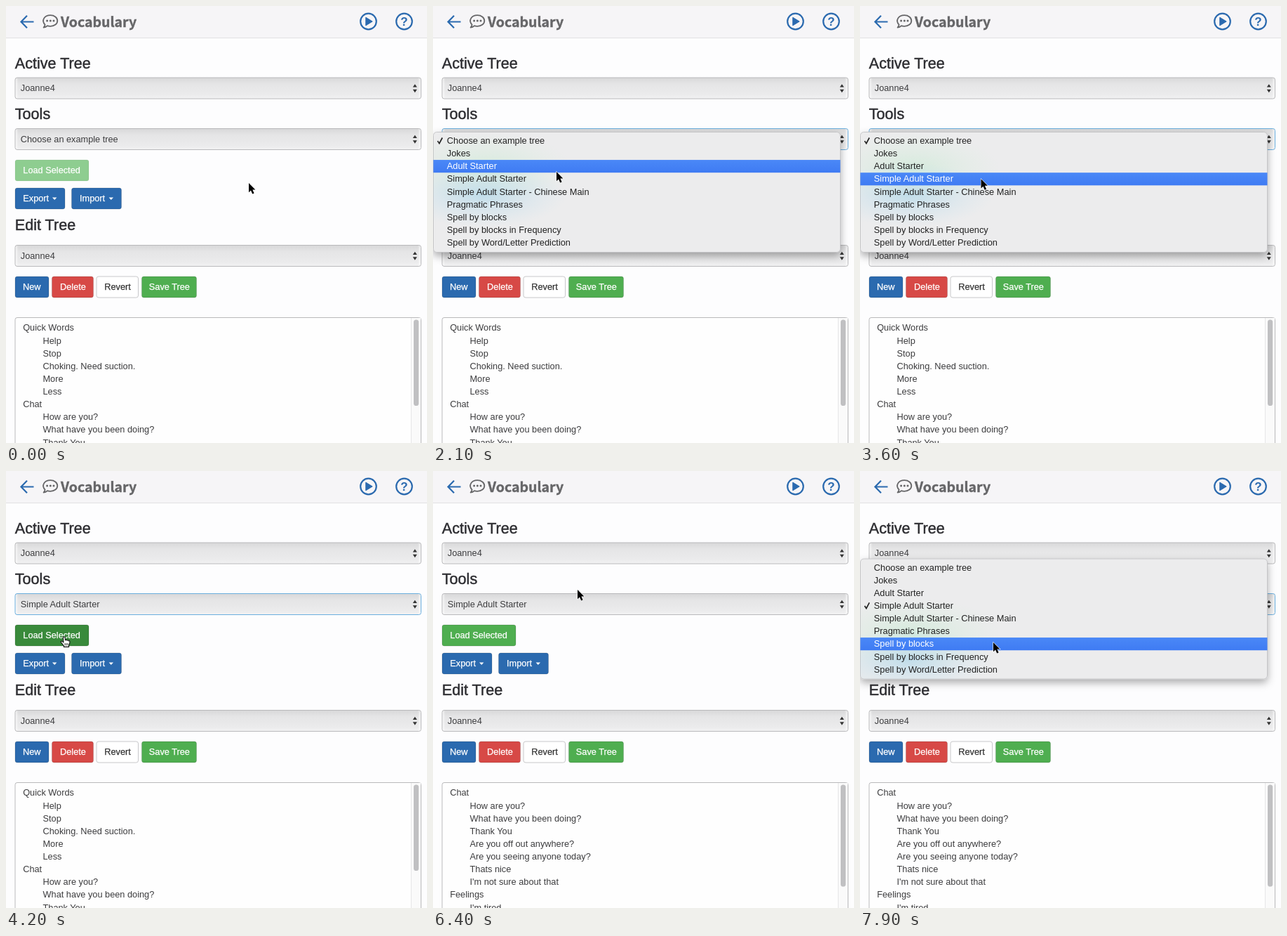
These frames come from a looping animation (600x622 px, 8 s). An HTML page:

```html
<!DOCTYPE html>
<html lang="en">
<head>
<meta charset="utf-8">
<title>Vocabulary</title>
<style>
  html, body { margin: 0; width: 100%; height: 100%; overflow: hidden; background: #fdfdfe; }
  svg { display: block; }
  text { font: 12.75px "Liberation Sans", Arial, sans-serif; fill: #3c3c3e; white-space: pre; }
  .title { font: 700 19.5px "Noto Sans CJK JP", "Noto Sans CJK SC", "Noto Sans", sans-serif; fill: #666668; stroke: #666668; stroke-width: .4px; }
  .head { font-size: 21.6px; fill: #2c2c30; stroke: #2c2c30; stroke-width: .45px; }
  .btn { fill: #fff; stroke: #fff; stroke-width: .25px; }
  .plain { fill: #333; stroke: #333; }
  .item { font-size: 12.8px; fill: #222; }
  .on { fill: #fff; }
</style>
</head>
<body>
<svg id="stage" width="600" height="622" viewBox="0 0 600 622">
  <defs>
    <linearGradient id="field" x1="0" y1="0" x2="0" y2="1">
      <stop offset="0" stop-color="#d8d8d9"/>
      <stop offset=".3" stop-color="#e5e5e6"/>
      <stop offset=".8" stop-color="#ebebec"/>
      <stop offset="1" stop-color="#f2f2f3"/>
    </linearGradient>
    <linearGradient id="ends">
      <stop offset="0" stop-color="#fff" stop-opacity=".8"/>
      <stop offset=".008" stop-color="#fff" stop-opacity="0"/>
      <stop offset=".992" stop-color="#fff" stop-opacity="0"/>
      <stop offset="1" stop-color="#fff" stop-opacity=".8"/>
    </linearGradient>
    <linearGradient id="bar" x1="0" y1="0" x2="0" y2="1">
      <stop offset="0" stop-color="#4a88f7"/>
      <stop offset="1" stop-color="#3f7bf3"/>
    </linearGradient>
    <radialGradient id="greenGlow">
      <stop offset="0" stop-color="#c4e9d0" stop-opacity=".6"/>
      <stop offset="1" stop-color="#d4eeda" stop-opacity="0"/>
    </radialGradient>
    <radialGradient id="blueGlow">
      <stop offset="0" stop-color="#b4d8ea" stop-opacity=".75"/>
      <stop offset="1" stop-color="#c8e2ee" stop-opacity="0"/>
    </radialGradient>
    <filter id="shadow" x="-10%" y="-10%" width="120%" height="130%">
      <feDropShadow dx="0" dy="5" stdDeviation="6" flood-color="#000" flood-opacity=".32"/>
    </filter>
    <clipPath id="panel"><rect id="panelBox" x="0.5" width="580" height="171" rx="5"/></clipPath>
  </defs>
  <g id="page"></g>
  <g id="tools"></g>
  <g id="list"></g>
  <g id="menu"></g>
  <g id="pointer"></g>
</svg>
<script>
const LOOP = 8000, TICK = 100;
const BLUE = '#2b6aaf', GREEN = '#4fae50', RED = '#d74946';
const ROW = 18.13;
const TREE = 'Joanne4';
const OPTIONS = [
  'Choose an example tree', 'Jokes', 'Adult Starter', 'Simple Adult Starter',
  'Simple Adult Starter - Chinese Main', 'Pragmatic Phrases', 'Spell by blocks',
  'Spell by blocks in Frequency', 'Spell by Word/Letter Prediction'
];
// A leading ">" marks an indented line.
const FIRST_LIST = ['Quick Words', '>Help', '>Stop', '>Choking. Need suction.', '>More', '>Less',
  'Chat', '>How are you?', '>What have you been doing?', '>Thank You'];
const SECOND_LIST = ['Chat', '>How are you?', '>What have you been doing?', '>Thank You',
  '>Are you off out anywhere?', '>Are you seeing anyone today?', '>Thats nice',
  ">I'm not sure about that", 'Feelings', ">I'm tired"];

// Pointer tip: time, x, y
const PATH = [
  [0, 346, 252], [200, 344, 250], [600, 268, 217], [1000, 186, 190], [1200, 178, 187],
  [1600, 178, 187], [1800, 177, 207], [2100, 176, 236], [2500, 177, 254], [2900, 177, 256],
  [3300, 174, 247], [3700, 172, 246], [4000, 90, 237], [4200, 83, 236], [5500, 83, 236],
  [5900, 125, 212], [6400, 206, 169], [6700, 192, 187], [7200, 190, 189], [7500, 190, 208],
  [7900, 190, 244], [8000, 190, 244]
];
const MENUS = [
  { from: 1300, to: 3700, top: 179.5, checked: 0 },
  { from: 6900, to: 8000, top: 125, checked: 3 }
];
const PICKED = 3700, PRESSED = 4400, LOADED = 5600;

const $ = id => document.getElementById(id);
const during = (t, a, b) => t >= a && t < b;

const label = (s, x, y, cls = '') => `<text x="${x}" y="${y}" class="${cls}">${s}</text>`;

const box = (x, y, w, h, fill, stroke, r = 3) =>
  `<rect x="${x}" y="${y}" width="${w}" height="${h}" rx="${r}" fill="${fill}" stroke="${stroke}"/>`;

function select(s, y, focused) {
  return box(13, y, 578.5, 30, 'url(#field)', 'none') +
    box(13, y, 578.5, 30, 'url(#ends)', focused ? '#6aaede' : '#b9b9bb') +
    label(s, 20.8, y + 19.3) +
    `<path d="M579.8 ${y + 13.6}h6l-3 -4.4zM579.8 ${y + 16.8}h6l-3 4.4z" fill="#333"/>`;
}

function button(s, x, y, w, fill, tx, cls = 'btn', edge = 'rgba(0,0,0,.14)') {
  return box(x + .5, y + .5, w - 1, 30, fill, edge) + label(s, tx, y + 19.7, cls);
}

const caret = x => `<path d="M${x} 272.5h6.4l-3.2 3.6z" fill="#fff"/>`;

function drawPage() {
  const dots = [58.6, 63.3, 68].map(x => `<circle cx="${x}" cy="21" r="1.5" fill="#666668"/>`).join('');
  $('page').innerHTML =
    '<rect width="600" height="622" fill="#fdfdfe"/>' +
    '<rect width="600" height="45" fill="#f6f5f7"/><rect y="45" width="600" height="1" fill="#e1e1e3"/>' +
    `<g fill="none" stroke="${BLUE}" stroke-width="2.2">
       <path d="M30 13.8L21.5 22.5L30 31.2M21.5 22.5H39.5"/>
       <circle cx="516.5" cy="22" r="11.3"/><circle cx="567.5" cy="22" r="11.3"/></g>
     <path d="M512.8 16.2V27.8L522.2 22z" fill="${BLUE}" stroke="${BLUE}" stroke-linejoin="round"/>
     <text x="562.3" y="28.2" style="font-size:17px;font-weight:700;fill:${BLUE}">?</text>
     <path d="M55.6 26.6C50 20.5 54.6 13.2 63.3 13.2C69 13.2 73.3 16.6 73.3 21S69 28.8 63.3 28.8C61.6 28.8 60.2 28.6 59 28.1C57.4 29.6 55.6 30.4 53.6 30.5C54.8 29.2 55.4 28 55.6 26.6z"
       fill="none" stroke="#666668" stroke-width="1.8" stroke-linejoin="round"/>` + dots +
    label('Vocabulary', 78, 30, 'title') +
    label('Active Tree', 12.8, 89, 'head') +
    label('Tools', 12.8, 161, 'head') +
    label('Edit Tree', 12.8, 318.5, 'head') +
    select(TREE, 102, false) + select(TREE, 340.5, false) +
    button('Export', 12.5, 258.5, 72, BLUE, 24.3) + caret(66) +
    button('Import', 93, 258.5, 72, BLUE, 105) + caret(146.6) +
    button('New', 12.5, 384.5, 49, BLUE, 24) +
    button('Delete', 65, 384.5, 60, RED, 77) +
    button('Revert', 128.5, 384.5, 60.5, '#fff', 140.3, 'btn plain', '#c8c8ca') +
    button('Save Tree', 193, 384.5, 79, GREEN, 203.8);
}

function drawList(lines, thumb) {
  $('list').innerHTML = box(13, 443.5, 578.5, 200, '#fefefe', '#b9b9bb') +
    '<rect x="577" y="444" width="14" height="178" fill="#fafafa"/>' +
    '<rect x="577" y="444" width="1" height="178" fill="#e6e6e8"/>' +
    `<rect x="581" y="446.5" width="7.2" height="${thumb}" rx="3.6" fill="#c0c0c2"/>` +
    lines.map((s, i) => {
      const inner = s[0] === '>';
      return label(inner ? s.slice(1) : s, inner ? 52.5 : 24.2, 462.4 + i * ROW);
    }).join('');
}

function drawMenu(m, hover, opacity) {
  const y = m.top;
  $('panelBox').setAttribute('y', y);
  const rows = OPTIONS.map((s, i) => {
    const top = y + 3.3 + i * ROW, on = i === hover;
    return (on ? `<rect x="0.5" y="${top}" width="580" height="${ROW}" fill="url(#bar)"/>` : '') +
      (i === m.checked ? `<path d="M6.6 ${top + 9.3}l2.4 3.6l4.3 -8.2" fill="none" stroke="${on ? '#fff' : '#222'}" stroke-width="1.7"/>` : '') +
      label(s, 19.8, top + 13.3, on ? 'item on' : 'item');
  }).join('');
  $('menu').innerHTML = `<g opacity="${opacity}">
    <rect x="0.5" y="${y}" width="580" height="171" rx="5" fill="#ececed" stroke="#bdbdbf" stroke-width=".8" filter="url(#shadow)"/>
    <g clip-path="url(#panel)">
      <ellipse cx="75" cy="232" rx="125" ry="52" fill="url(#greenGlow)"/>
      <ellipse cx="70" cy="269" rx="120" ry="46" fill="url(#blueGlow)"/>
    </g>${rows}</g>`;
}

function pointerAt(t) {
  const i = PATH.findIndex(p => p[0] > t);
  const [t0, x0, y0] = PATH[i - 1], [t1, x1, y1] = PATH[i];
  const k = (t - t0) / (t1 - t0);
  return [x0 + (x1 - x0) * k, y0 + (y1 - y0) * k];
}

const ARROW = '<path d="M0 0V13.2L3 10.4L5.2 15.4L7.6 14.4L5.4 9.5H9.4z" fill="#000" stroke="#fff" stroke-width="1.1" paint-order="stroke"/>';
const HAND = `<path d="M-1.6 1C-1.6 -.5 .9 -.5 1 1L1.6 5C2 3.8 4 4 4.1 5.2C4.6 4.4 6.2 4.7 6.3 5.9C7 5.3 8 5.7 8 6.9C8 9.5 7.4 10.6 6.6 12V14.4H-.6V12.8C-1.8 11.3 -3 9.6 -4.6 7.8C-5.4 6.4 -3.6 5.6 -2.4 6.8L-1 8z"
  fill="#fff" stroke="#111" stroke-width="1.1" stroke-linejoin="round"/>
  <path d="M1 9V12.4M3 9V12.4M5 9V12.4" stroke="#111" stroke-width=".8"/>`;

function drawPointer(x, y, hand) {
  $('pointer').innerHTML = `<g transform="translate(${x} ${y})">${hand ? HAND : ARROW}</g>`;
}

function render(t) {
  const [x, y] = pointerAt(t);
  const picked = t >= PICKED;
  const menu = MENUS.find(m => during(t, m.from, m.to + TICK));
  const overLoad = picked && !menu && during(x, 13, 119) && during(y, 219, 250);
  const focused = during(t, 1600, PRESSED) || t >= 7000;
  const fill = !picked ? '#8ecd90' : overLoad ? '#398a3b' : GREEN;

  $('tools').innerHTML = select(OPTIONS[picked ? 3 : 0], 174.5, focused) +
    button('Load Selected', 12.5, 218.5, 106, fill, 24.3, 'btn', picked ? undefined : 'rgba(0,0,0,.05)');

  if (t >= LOADED) drawList(SECOND_LIST, 145);
  else drawList(FIRST_LIST, 122.5);

  if (menu) drawMenu(menu, Math.floor((y - menu.top - 3.3) / ROW), t < menu.to ? 1 : .5);
  else $('menu').innerHTML = '';

  drawPointer(x, y, overLoad);
}

drawPage();
const start = performance.now();
let last = -1;
function frame() {
  const t = Math.floor((performance.now() - start) % LOOP / TICK) * TICK;
  if (t !== last) render(last = t);
  requestAnimationFrame(frame);
}
frame();
</script>
</body>
</html>
```
